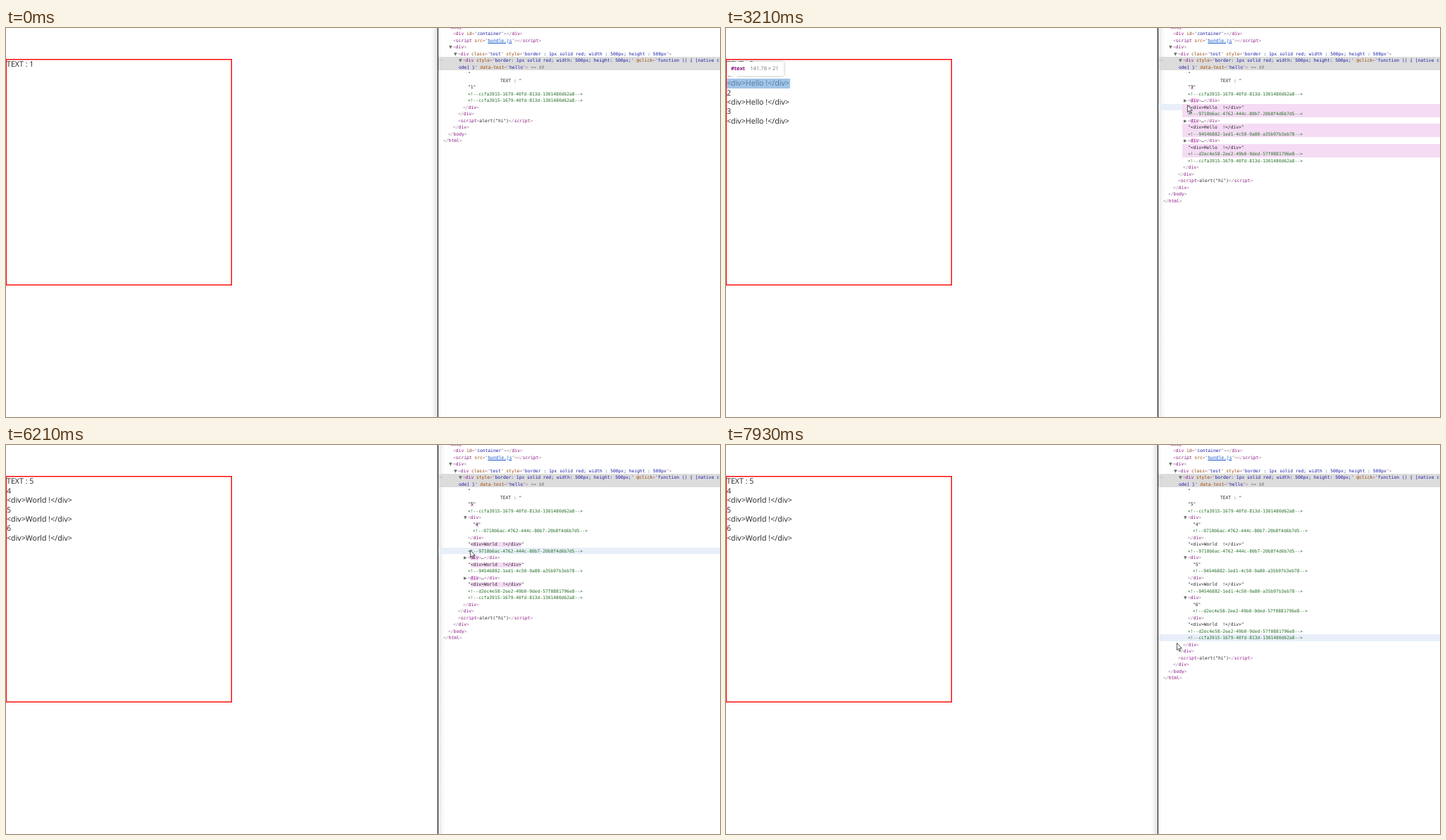
Animation of 1014x553 px, one loop 8 s. Source, as an HTML page:

```html
<!DOCTYPE html>
<html lang="en">
<head>
<meta charset="utf-8">
<title>Live DOM update</title>
<style>
  html, body { margin: 0; width: 100%; height: 100%; overflow: hidden; background: #fff; }
  body { position: relative; text-rendering: geometricPrecision; }
  div, svg { position: absolute; box-sizing: border-box; white-space: pre; }
  i { font-style: normal; }

  #frame { left: 0; top: 44px; width: 321px; height: 322px; border: 1px solid #f00;
    box-shadow: inset -1px 0 rgba(255, 0, 0, .4), inset 0 1px rgba(255, 0, 0, .4), inset 0 -1px rgba(255, 0, 0, .4); }
  #page div { left: 1px; height: 13.4px; margin-top: .8px; color: #222;
    font: 10.7px/13.4px "Open Sans", "Noto Sans", sans-serif; }

  #highlight { left: 1px; height: 13.6px; background: rgba(111, 168, 220, .66); }
  #tip { left: 1px; height: 19.5px; padding: 0 7px 0 6px; border-radius: 2px; background: #fff;
    box-shadow: 0 0 4px rgba(0, 0, 0, .3); font: 7.5px/21px "Open Sans", sans-serif; color: #777; }
  #tip b { color: #881280; margin-right: 7.5px; }
  #tip::after { content: ""; position: absolute; left: 7px; top: 19px;
    border: solid transparent; border-width: 5px 5px 0; border-top-color: #fff; }

  #divider { left: 612px; top: 0; width: 2px; height: 553px; border-left: 1px solid rgba(0, 0, 0, .25); background: #222; background-clip: padding-box; }
  #shade { top: 0; width: 9px; height: 553px; }
  #selected { left: 614px; top: 41px; width: 400px; height: 19px; background: #dcdcdc; }
  #hover { left: 614px; width: 400px; height: 9.5px; background: #e8eff9; }

  #tree { left: 0; top: 0; width: 1014px; height: 553px; overflow: hidden;
    font: 6.3px/9.5px "DejaVu Sans Mono", monospace; color: #222; }
  #tree div { height: 9.5px; }
  #tree .text { margin-top: .9px; }
  .band { left: 648px; width: 366px; background: var(--flash); }
  .lit { background: var(--flash); }
  #tree .arrow { font: 6px/9.5px "DejaVu Sans", sans-serif; color: #6e6e6e; }
  .p { color: #a080a0; }
  .t { color: #881280; }
  .a { color: #994500; }
  .v { color: #1a1aa6; }
  .c { color: #236e25; }
  .u { color: #1155cc; text-decoration: underline; }
  .g { color: #777; font-style: italic; }
  #cursor { left: 0; top: 0; overflow: visible; }
</style>
</head>
<body>
<div id="frame"></div>
<div id="page"></div>
<div id="highlight"></div>
<div id="tip"></div>
<div id="shade"></div>
<div id="divider"></div>
<div id="selected"></div>
<div id="hover"></div>
<div id="tree"></div>
<svg id="cursor" width="9" height="14"><path d="M.4 .4V10.6L2.7 8.5 4.2 12.2 5.7 11.6 4.2 8H7.3Z" fill="#fff" stroke="#222" stroke-width=".8"/></svg>

<script>
const LOOP = 8000, ROW = 9.5, TREE_TOP = 3.25, LINE = 13.4, PAGE_TOP = 45.6;
const FLASH = 1400, HOVER_LAG = 30, OVERLAY_LAG = 80;
const CLICKS = [560, 1960, 3950, 4970];
const UPDATES = [750, 2200, 4100, 5200];
const EXPANDS = [3420, 6740, 7580];
const FOCUS = [560, 3680, 3950, 6590];   // window focus toggles between tools and page
const IDS = ['9710b6ac-4762-444c-80b7-20b8f4d6b7d5',
             '94546882-1ed1-4c50-9a80-a35b97b3eb78',
             'd2ec4e58-2ee2-49b0-9ded-57f0881796e8'];
const ROOT_ID = 'ccfa3915-1679-40fd-813d-1301480d62a8';
const PATH = [
  [0, 697, 557], [60, 697, 557], [430, 191, 266], [2230, 191, 266], [2450, 444, 146],
  [2680, 655, 111], [3100, 655, 110], [3240, 655, 109], [3330, 652, 101], [3600, 652, 101],
  [3880, 169, 223], [5780, 169, 223], [6120, 659, 149], [6350, 659, 149], [6480, 653, 158],
  [6900, 652, 160], [6990, 651, 184], [7120, 651, 214], [7620, 652, 216], [7930, 640, 281], [LOOP, 640, 281]
];

const $ = id => document.getElementById(id);
const passed = (times, t) => times.filter(s => t >= s).length;
const esc = s => s.replace(/&/g, '&amp;').replace(/</g, '&lt;');
const ink = (cls, s) => `<i class="${cls}">${esc(s)}</i>`;
const attr = (name, value) => ' ' + ink('a', name) + ink('p', '="') + ink('v', value) + ink('p', '"');
const open = (name, attrs = '', cls = 't') => ink('p', '<') + ink(cls, name) + attrs + ink('p', '>');
const close = name => ink('p', '</') + ink('t', name) + ink('p', '>');
const comment = id => ink('c', `<!--${id}-->`);
const quoted = (s, lit) => '"' + ink(lit ? 'lit' : '', s) + '"';

function cursorAt(t) {
  const i = Math.max(1, PATH.findIndex(p => p[0] > t));
  const [t0, x0, y0] = PATH[i - 1], [t1, x1, y1] = PATH[i];
  const k = Math.max(0, (t - t0) / (t1 - t0));
  return [x0 + (x1 - x0) * k, y0 + (y1 - y0) * k];
}

function listFor(count) {
  if (count < 3) return null;
  return count < 5 ? { first: 1, word: 'Hello' } : { first: 4, word: 'World' };
}

function treeRows(count, opened) {
  const rows = [];
  const add = (x, html, more) => rows.push({ x, html, ...more });
  const list = listFor(count), inserted = count === 3, replaced = count === 5;

  add(635, open('div', attr('id', 'container')) + close('div'));
  add(635, ink('p', '<') + ink('t', 'script') + ' ' + ink('a', 'src') + ink('p', '="') +
    ink('u', 'bundle.js') + ink('p', '">') + close('script'));
  add(635, open('div'), { arrow: '▼' });
  add(642, open('div', attr('class', 'test') +
    attr('style', 'border : 1px solid red; width : 500px; height : 500px')), { arrow: '▼' });
  add(649, ink('p', '<') + ink('t', 'div') + attr('style', 'border: 1px solid red; width: 500px; height: 500px;') +
    ' ' + ink('a', '@click') + ink('p', '="') + ink('v', 'function () { [native c'), { arrow: '▼' });
  add(643, ink('v', 'ode] }') + ink('p', '"') + attr('data-test', 'hello') + ink('p', '>') + ink('g', ' == $0'));
  add(656, '"');
  add(702, 'TEXT : "');
  add(656, quoted(String(count), count > 1));
  add(656, comment(ROOT_ID));
  if (list) IDS.forEach((id, k) => {
    const overlay = { name: 'div', size: '500 × 21', line: 1 + 2 * k, width: 319 };
    if (k < opened) {
      add(656, open('div'), { arrow: '▼', overlay });
      add(663, quoted(String(list.first + k), replaced));
      add(663, comment(id));
      add(656, close('div'));
    } else {
      add(656, open('div', '', inserted || replaced ? 't lit' : 't') + '…' + close('div'), { arrow: '▶', overlay });
    }
    const hello = list.word === 'Hello';
    add(656, quoted(`<div>${list.word}  !</div>`, replaced), { band: inserted, overlay: {
      name: '#text', size: (hello ? '141.78' : '146.64') + ' × 21', line: 2 + 2 * k, width: hello ? 90.4 : 93.5 } });
    add(656, comment(id), { band: inserted });
  });
  add(656, comment(ROOT_ID));
  add(649, close('div'));
  add(642, close('div'));
  add(642, open('script') + 'alert("hi")' + close('script'));
  add(635, close('div'));
  add(628, close('body'));
  add(621, close('html'));
  return rows;
}

function treeHtml(rows) {
  const at = (x, i, html, cls = '') =>
    `<div class="text ${cls}" style="left:${x}px;top:${TREE_TOP + i * ROW}px">${html}</div>`;
  const parts = rows.map((r, i) =>
    (r.band ? `<div class="band" style="top:${TREE_TOP + i * ROW}px"></div>` : '') +
    (r.arrow ? at(r.x - 6, i, r.arrow, 'arrow') : '') + at(r.x, i, r.html));
  return at(628, -1, open('body')) + at(615, 4, '···', 'arrow') + parts.join('');
}

function pageHtml(count) {
  const lines = ['TEXT : ' + count], list = listFor(count);
  if (list) for (let k = 0; k < 3; k++) lines.push(String(list.first + k), `<div>${list.word} !</div>`);
  return lines.map((s, i) => `<div style="top:${PAGE_TOP + i * LINE}px">${esc(s)}</div>`).join('');
}

function flashColor(age) {
  const p = age / FLASH, ease = x => 1 - (1 - x) ** 3;
  if (p < 0 || p >= 1) return 'transparent';
  if (p > .8) return `rgba(245,219,244,${1 - ease((p - .8) / .2)})`;
  const k = ease(p / .8), mix = (a, b) => a + (b - a) * k;
  return `rgb(${mix(158, 245)},${mix(54, 219)},${mix(153, 244)})`;
}

const shown = {};
function setHtml(id, key, make) {
  if (shown[id] === key) return;
  shown[id] = key;
  $(id).innerHTML = make();
}

function rowUnder(t) {
  const [x, y] = cursorAt(Math.max(0, t));
  return x < 614 ? -1 : Math.floor((y - TREE_TOP) / ROW);
}

function render(t) {
  const count = 1 + passed(CLICKS, t), updates = passed(UPDATES, t), opened = passed(EXPANDS, t);
  const rows = treeRows(1 + updates, opened);
  setHtml('page', count, () => pageHtml(count));
  setHtml('tree', updates + '/' + opened, () => treeHtml(rows));
  $('tree').style.setProperty('--flash', updates ? flashColor(t - UPDATES[updates - 1]) : 'transparent');

  const hovered = rowUnder(t - HOVER_LAG), hover = $('hover').style;
  hover.display = rows[hovered] ? '' : 'none';
  hover.top = TREE_TOP + hovered * ROW + 'px';

  const target = rows[rowUnder(t - OVERLAY_LAG)], overlay = target && target.overlay;
  $('highlight').style.display = $('tip').style.display = overlay ? '' : 'none';
  if (overlay) {
    const top = PAGE_TOP + overlay.line * LINE;
    $('highlight').style.top = top + 'px';
    $('highlight').style.width = overlay.width + 'px';
    $('tip').style.top = top - 24 + 'px';
    setHtml('tip', overlay.name + overlay.size, () => `<b>${overlay.name}</b>${overlay.size}`);
  }

  const pageActive = passed(FOCUS, t) % 2 === 1, shade = $('shade').style;
  shade.left = (pageActive ? 614 : 603) + 'px';
  shade.background = `linear-gradient(${pageActive ? 90 : 270}deg, rgba(0,0,0,.12), rgba(0,0,0,.04) 50%, transparent)`;

  const [x, y] = cursorAt(t);
  $('cursor').style.transform = `translate(${x}px,${y}px)`;
}

const start = performance.now();
function tick() {
  render((performance.now() - start) % LOOP);
  requestAnimationFrame(tick);
}
tick();
</script>
</body>
</html>
```
